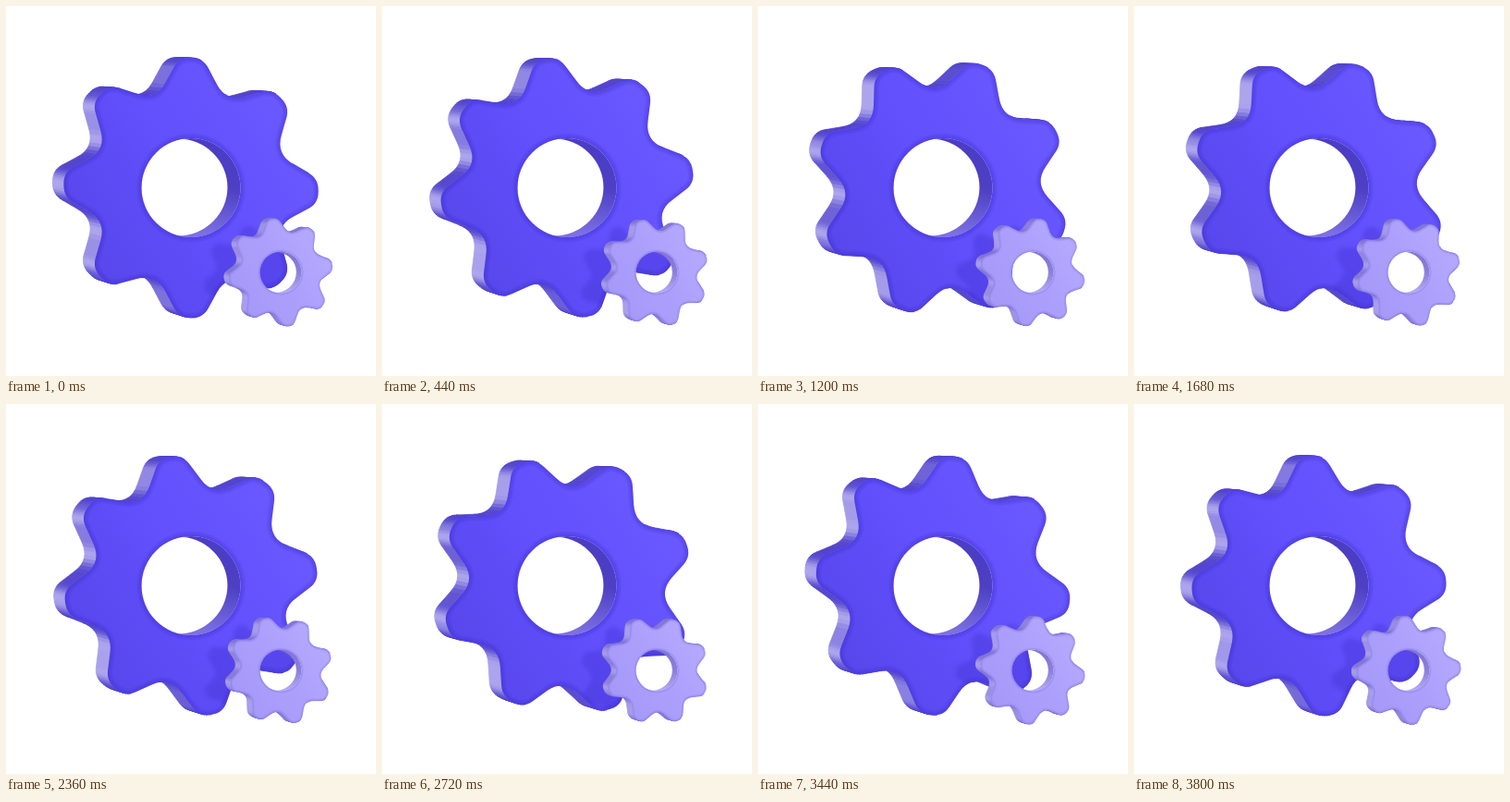
An HTML page with a canvas that plays this animation: 400x400 px, repeating every 3.84 s.

```html
<!DOCTYPE html>
<html>
<head>
<meta charset="utf-8">
<title>Gears</title>
<style>
html, body { margin: 0; width: 100%; height: 100%; overflow: hidden; background: #fff; }
canvas { display: block; width: 400px; height: 400px; }
</style>
</head>
<body>
<canvas id="stage" width="400" height="400"></canvas>
<script>
const ctx = document.getElementById('stage').getContext('2d');
const LOOP = 3840, STEP = 40, TEETH = 8, RAD = Math.PI / 180;
const SKEW = 0.025;

// [step, degrees] of the large gear
const TURN = [[0, 0], [1, 0], [11, 36], [30, 108], [42, 154.2], [59, 216], [78, 288], [95, 356.8], [96, 360]];

const LARGE = {
  x: 200, y: 196.5, r: 141, hole: 53.5, sx: 0.98, depth: [-14, -2.5], start: 0, ratio: 1,
  face: ['#6a59ff', '#6150fc', '#5847ec'], edge: [58, 42, 200],
  wall: [82, 68, 205], shine: [212, 207, 250], bore: ['#4a3cc4', '#4d40c4', '#7d70e2']
};
const SMALL = {
  x: 297, y: 288, r: 58.5, hole: 22.5, sx: 0.97, depth: [-6, -1], start: -9, ratio: -1.5,
  face: ['#b4a9fe', '#ac9ffc', '#a599f8'], edge: [124, 109, 218],
  wall: [130, 118, 212], shine: [185, 176, 245], bore: ['#7f71cc', '#8e80da', '#b5acf4']
};

const lerp = (a, b, k) => a + (b - a) * k;
const rgb = (c, alpha = 1) => `rgba(${c.map(Math.round).join(',')},${alpha})`;

function turnAt(step) {
  const i = Math.max(1, TURN.findIndex(key => key[0] >= step));
  const [s0, a0] = TURN[i - 1], [s1, a1] = TURN[i];
  return lerp(a0, a1, (step - s0) / (s1 - s0));
}

// Unit outline of a gear with tapered teeth and softened corners, one tooth pointing up
const OUTLINE = (() => {
  const corners = [], points = [];
  const polar = (r, deg) => [r * Math.sin(deg * RAD), -r * Math.cos(deg * RAD)];
  for (let i = 0; i < TEETH; i++) {
    const mid = i * 360 / TEETH;
    for (const [r, deg, cut] of [[1, -5.4, 0.085], [1, 5.4, 0.085], [0.72, 22.5, 0.15]]) {
      corners.push({ p: polar(r, mid + deg), cut });
    }
  }
  const toward = (a, b, dist) => {
    const k = dist / Math.hypot(b[0] - a[0], b[1] - a[1]);
    return [lerp(a[0], b[0], k), lerp(a[1], b[1], k)];
  };
  corners.forEach(({ p, cut }, i) => {
    const a = toward(p, corners.at(i - 1).p, cut);
    const b = toward(p, corners[(i + 1) % corners.length].p, cut);
    for (let k = 0; k <= 1.001; k += 0.125) {
      points.push([0, 1].map(d => lerp(lerp(a[d], p[d], k), lerp(p[d], b[d], k), k)));
    }
  });
  return points;
})();

function place(gear, turn) {
  const angle = (gear.start + turn * gear.ratio) * RAD;
  const c = Math.cos(angle) * gear.r, s = Math.sin(angle) * gear.r;
  return OUTLINE.map(([x, y]) => {
    const u = x * c - y * s, v = x * s + y * c;
    return [gear.x + u * gear.sx, gear.y + v + u * SKEW];
  });
}

function toPath(points) {
  const path = new Path2D();
  points.forEach(([x, y]) => path.lineTo(x, y));
  path.closePath();
  return path;
}

function ellipse(x, y, rx, ry) {
  const path = new Path2D();
  path.ellipse(x, y, rx, ry, 0, 0, 2 * Math.PI);
  return path;
}

function gradient(x0, y0, x1, y1, colors) {
  const g = ctx.createLinearGradient(x0, y0, x1, y1);
  colors.forEach((color, i) => g.addColorStop(i / (colors.length - 1), color));
  return g;
}

function drawWalls(gear, front) {
  const [dx, dy] = gear.depth;
  const back = front.map(([x, y]) => [gear.x + (x - gear.x) * 0.985 + dx, gear.y + (y - gear.y) * 0.985 + dy]);
  front.forEach((a, i) => {
    const j = (i + 1) % front.length, b = front[j];
    const len = Math.hypot(b[0] - a[0], b[1] - a[1]);
    if (len < 0.01) return;
    const nx = (b[1] - a[1]) / len, ny = (a[0] - b[0]) / len;
    if (nx * dx + ny * dy < -5) return;
    const lit = Math.max(0, -nx) ** 6 * 0.7;
    const color = rgb(gear.wall.map((v, d) => lerp(v, gear.shine[d], lit)));
    const quad = toPath([a, b, back[j], back[i]]);
    ctx.fillStyle = ctx.strokeStyle = color;
    ctx.lineWidth = 0.8;
    ctx.fill(quad);
    ctx.stroke(quad);
  });
}

function drawBore(gear) {
  const [dx, dy] = gear.depth, { x, y, hole, sx } = gear;
  ctx.save();
  ctx.clip(ellipse(x, y, hole, hole));
  const ring = new Path2D();
  ring.addPath(ellipse(x, y, hole + 20, hole + 20));
  ring.addPath(ellipse(x + dx, y + dy * 0.2, hole * sx + 1, hole * 0.98));
  ctx.fillStyle = gradient(x + hole, y - hole, x + hole * 0.5, y + hole, gear.bore);
  ctx.fill(ring, 'evenodd');
  ctx.restore();
}

function drawFace(gear, front, shadow) {
  const { x, y, r, hole } = gear;
  const face = toPath(front);
  face.addPath(ellipse(x, y, hole, hole));
  ctx.save();
  ctx.clip(face, 'evenodd');
  ctx.fillStyle = gradient(x + r * 0.8, y - r * 0.5, x - r * 0.8, y + r * 0.5, gear.face);
  ctx.fillRect(x - r, y - r * 1.1, 2 * r, 2.2 * r);
  if (shadow) {
    ctx.save();
    ctx.filter = 'blur(2px)';
    ctx.translate(-27, 8);
    ctx.fillStyle = 'rgba(48,30,180,0.22)';
    ctx.fill(shadow);
    ctx.restore();
  }
  for (const width of [0.075, 0.05, 0.025]) {
    ctx.lineWidth = r * width;
    ctx.strokeStyle = rgb(gear.edge, 0.14);
    ctx.stroke(face);
  }
  ctx.restore();
}

function drawGear(gear, front, shadow) {
  drawWalls(gear, front);
  drawBore(gear);
  drawFace(gear, front, shadow);
}

function draw(now) {
  const turn = turnAt(Math.floor((now % LOOP) / STEP));
  const large = place(LARGE, turn), small = place(SMALL, turn);
  ctx.fillStyle = '#fff';
  ctx.fillRect(0, 0, 400, 400);
  drawGear(LARGE, large, toPath(small));
  drawGear(SMALL, small);
}

let begin;
function tick(now) {
  begin ??= now;
  draw(now - begin);
  requestAnimationFrame(tick);
}
draw(0);
requestAnimationFrame(tick);
</script>
</body>
</html>
```
